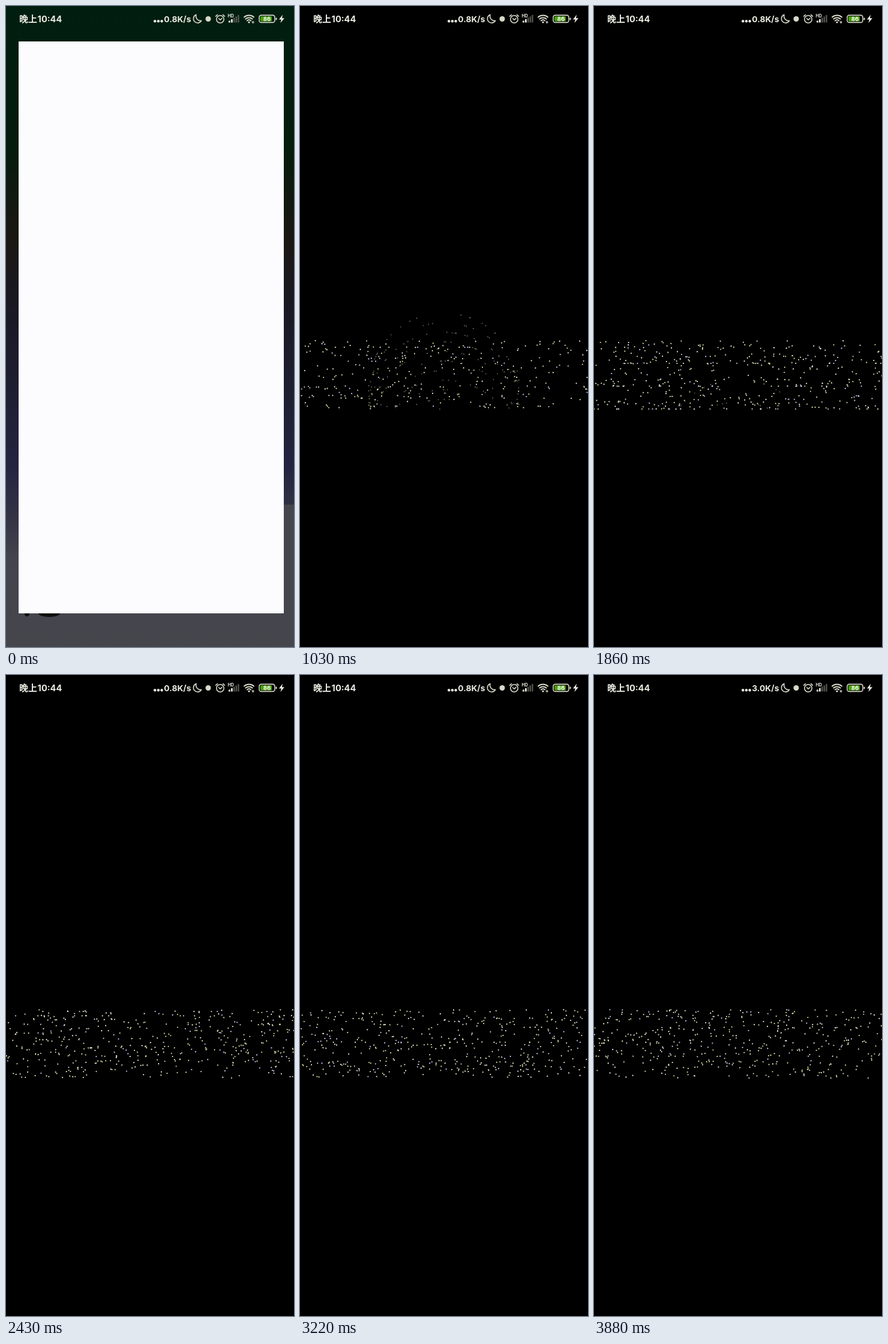
Recreate the animation shown at these times as an HTML page with a canvas. Size 480 px wide and 1067 px high, loop 3920 ms.

```html
<!DOCTYPE html>
<html lang="zh">
<head>
<meta charset="utf-8">
<title>Falling particles</title>
<style>
  html, body { margin: 0; width: 100%; height: 100%; overflow: hidden; background: #000; }
  canvas, svg { position: absolute; left: 0; top: 0; display: block; }
  text { font-family: Inter, "Noto Sans CJK SC", "Noto Sans CJK", sans-serif; font-weight: 700; }
  .cjk { font-family: "Noto Sans CJK SC", "Noto Sans CJK", sans-serif; }
</style>
</head>
<body>
<canvas id="stage" width="480" height="1067"></canvas>
<svg id="bar" width="480" height="44" viewBox="0 0 480 44" fill="#ecece2" stroke="none">
  <text class="cjk" x="22" y="27" font-size="15">晚上</text>
  <text x="52.6" y="27" font-size="14.6">10:44</text>
  <circle cx="248.2" cy="25.3" r="2.2"/><circle cx="253.9" cy="25.3" r="2.2"/><circle cx="259.6" cy="25.3" r="2.2"/>
  <text id="rate" x="308.4" y="27" font-size="13.8" text-anchor="end">0.8K/s</text>
  <circle cx="337" cy="21.5" r="4.5" fill="#d8d8c8"/>
  <g fill="none" stroke="#d8d8c8" stroke-width="1.6" stroke-linecap="round" stroke-linejoin="round">
    <path d="M317 14.6A7 7 0 1 0 325.6 24.4A7.6 7.6 0 0 1 317 14.6Z"/>
    <circle cx="357" cy="22" r="6.2"/>
    <path d="M354.6 20.8L357 23.2L360 20.6M349.6 17.2L352.4 14.6M364.4 17.2L361.6 14.6"/>
    <path d="M397 18.6A12 12 0 0 1 413 18.6M399.4 21.6A8.6 8.6 0 0 1 410.6 21.6M401.8 24.4A5 5 0 0 1 408.2 24.4" stroke-width="2"/>
    <rect x="422" y="15.4" width="26" height="12" rx="3.4"/>
  </g>
  <circle cx="405" cy="27" r="1.6"/>
  <circle cx="411.6" cy="27" r="2" fill="#a8a898"/>
  <text x="369.6" y="18.6" font-size="7">HD</text>
  <path d="M371 24.5h2.8v3h-2.8zM375 22h2.8v5.5h-2.8z"/>
  <path d="M379 19.5h2.4v8h-2.4zM382.6 17.4h2.4v10.1h-2.4zM386.2 15h2.4v12.5h-2.4z" fill="#55574f"/>
  <rect x="424" y="17.3" width="19" height="8.2" rx="1.4" fill="#48a008"/>
  <text x="435" y="25" font-size="9.6" text-anchor="middle" fill="#fff">86</text>
  <rect x="449.6" y="19.4" width="1.8" height="4.2" rx=".8"/>
  <path d="M461 14.6L455 22.4H458.8L457.4 28.2L464 20.2H460Z"/>
</svg>
<script>
const W = 480, H = 1067, LOOP = 3920;
const OPEN = 410, STEP = 41.27;          // launch moment and picture interval, ms
const START = 432;                       // particles are released, ms
const CX = 240, TOP = 557, FLOOR = 671, RADIUS = 125.5;
const UNIT = 0.0267;                     // px per ms for speed 1
const COUNT = 460;
const BRIGHT = ['#e4e4c4', '#d6d69c', '#d4d4a4', '#c6c6f0', '#eeeee0'];
const DIM = ['#7c7c5c', '#6a6a46', '#747490'];

const ctx = document.getElementById('stage').getContext('2d');
const rate = document.getElementById('rate');

const rand = (a, b) => {
  const s = Math.sin(a * 127.1 + b * 311.7 + 7.3) * 43758.5453;
  return s - Math.floor(s);
};
const pick = (list, r) => list[Math.floor(r * list.length)];

const particles = Array.from({ length: COUNT }, (_, i) => {
  const angle = rand(i, 1) * Math.PI * 2;
  const speed = (5 + Math.floor(rand(i, 2) * 11)) * UNIT;
  const x = CX + RADIUS * Math.cos(angle), y = TOP + RADIUS * Math.sin(angle);
  return {
    x, y, speed, id: i,
    landing: Math.max(0, (FLOOR - y) / speed),
    bright: pick(BRIGHT, rand(i, 3)),
    dim: pick(DIM, rand(i, 4))
  };
});

function dot(x, y, r, color) {
  ctx.fillStyle = color;
  ctx.beginPath();
  ctx.arc(x, y, r, 0, 7);
  ctx.fill();
}

function drawParticles(age) {
  for (const p of particles) {
    if (age < p.landing) {
      dot(p.x, p.y + age * p.speed, 0.9, p.dim);
    } else {
      // after landing, fall again and again from a new place along the line
      const fallen = (age - p.landing) * p.speed, span = FLOOR - TOP;
      const turn = Math.floor(fallen / span);
      dot(rand(p.id, 10 + turn) * W, TOP + fallen % span, 1.1, p.bright);
    }
  }
}

const wallpaper = ctx.createLinearGradient(0, 0, 0, H);
[[0, '#001e10'], [.22, '#041c0c'], [.36, '#1a1712'], [.5, '#1a1a28'],
 [.72, '#242440'], [.8, '#343446'], [.86, '#44444e'], [1, '#45454c']]
  .forEach(([at, color]) => wallpaper.addColorStop(at, color));

function drawWallpaper() {
  ctx.fillStyle = wallpaper;
  ctx.fillRect(0, 0, W, H);
  ctx.fillStyle = '#45454e';
  ctx.fillRect(463, 830, 17, H - 830);
  ctx.fillStyle = '#0c100c';
  ctx.beginPath();
  ctx.ellipse(72, 1011, 18, 6, 0, 0, 7);
  ctx.ellipse(35, 1012, 4, 4, 0, 0, 7);
  ctx.fill();
}

function draw(t) {
  const step = Math.floor((t - OPEN + 8) / STEP);
  if (t < OPEN) {
    drawWallpaper();
    ctx.fillStyle = '#fcfcfe';
    ctx.fillRect(21, 59, 442, 952);
  } else {
    const inset = [5, 1][step] || 0;
    if (inset) drawWallpaper();
    ctx.fillStyle = '#000';
    ctx.fillRect(inset, inset * 2, W - 2 * inset, H - 4 * inset);
    drawParticles(Math.max(0, OPEN + step * STEP - START));
  }
  rate.textContent = step < 80 ? '0.8K/s' : '3.0K/s';
}

const begin = performance.now();
function tick() {
  draw((performance.now() - begin) % LOOP);
  requestAnimationFrame(tick);
}
tick();
</script>
</body>
</html>
```
